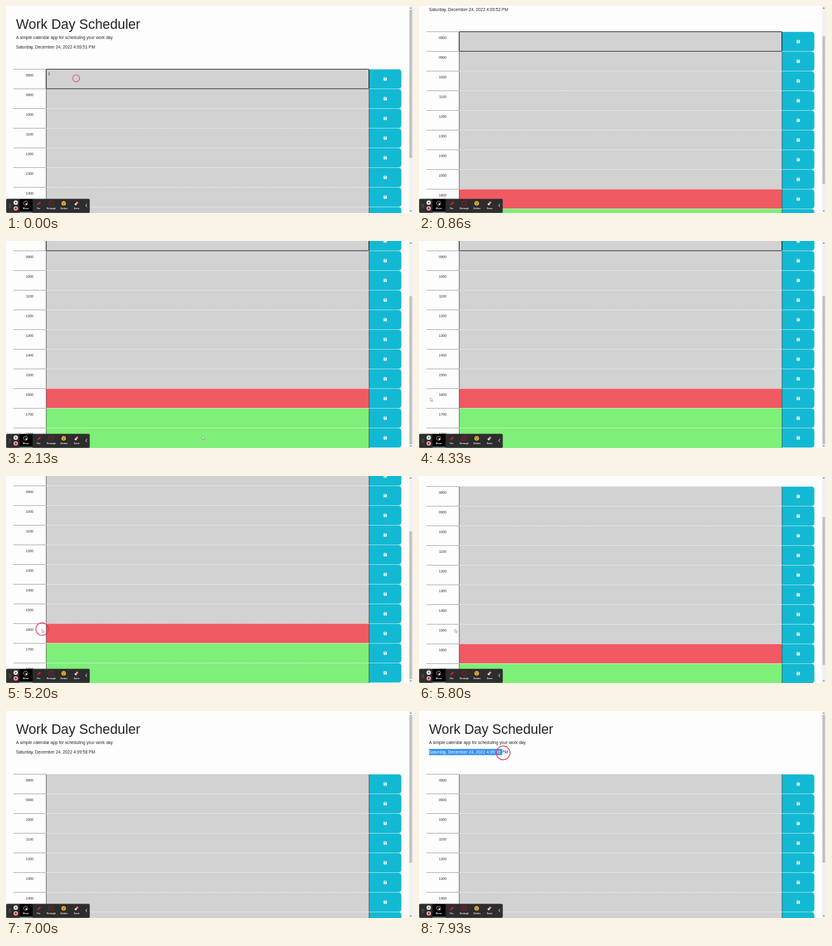
An HTML page that plays this animation: 640x326 px, repeating every 8000 ms.

```html
<!DOCTYPE html>
<html lang="en">
<head>
<meta charset="utf-8">
<title>Work Day Scheduler</title>
<style>
html, body { margin: 0; width: 100%; height: 100%; overflow: hidden; background: #fdfdfd; }
svg { display: block; width: 100vw; height: 100vh; }
text { font-family: "Liberation Sans", Arial, sans-serif; fill: #212529; white-space: pre; }
.small { font-size: 6.67px; }
.tool { font: 500 3.15px Roboto, sans-serif; fill: #fff; text-anchor: middle; }
</style>
</head>
<body>
<svg id="stage" viewBox="0 0 640 326">
  <defs>
    <clipPath id="selClip"><rect id="selArea" x="15.8" y="59.8" width="0" height="9.8"/></clipPath>
    <g id="disk">
      <path d="M-2.5-2.5H1.5L2.5-1.5V2.5H-2.5Z" fill="#fff"/>
      <path d="M-1.5-1.6H.9V-.4H-1.5Z" fill="#13b9d3"/>
      <circle cy="1.1" r=".7" fill="#13b9d3"/>
    </g>
  </defs>
  <g id="page">
    <text x="15.8" y="36" font-size="21.35">Work Day Scheduler</text>
    <text class="small" x="15.8" y="51.6">A simple calendar app for scheduling your work day</text>
    <text class="small" id="clock" x="15.8" y="67"></text>
    <g clip-path="url(#selClip)">
      <rect x="15" y="59" width="130" height="12" fill="#3390ee"/>
      <text class="small" id="clockSel" x="15.8" y="67" style="fill:#fff"></text>
    </g>
    <g id="rows"></g>
    <rect id="focus" x="63.2" y="99.5" width="507.4" height="30.8" rx=".6" fill="none" stroke="#222"/>
    <path id="caret" d="M67.8 104.2V109.4" stroke="#222" stroke-width=".7"/>
  </g>
  <g>
    <rect x="633.6" width="6.4" height="326" fill="#f1f1f1"/>
    <rect id="thumb" x="634.4" y="6" width="4.2" height="233" fill="#c1c1c1"/>
    <path d="M635 4L636.5 2.2L638 4ZM635 322L636.5 323.8L638 322Z" fill="#505050"/>
  </g>
  <g id="bar">
    <rect x=".3" y="303.8" width="131.3" height="21.9" rx="1.8" fill="#2d2d2e" stroke="#555" stroke-width=".4"/>
    <rect x="21.3" y="304" width="20.4" height="20.6" fill="#000"/>
    <rect x="21.3" y="324.2" width="20.4" height="1" fill="#9cc6cc"/>
    <path d="M5.2 312V318M7 312V318" stroke="#999" stroke-width=".9" stroke-dasharray=".9 1.4"/>
    <circle cx="15.3" cy="309.7" r="3.4" fill="#f4f4f4"/>
    <path d="M14.5 308.2V311.2M16.1 308.2V311.2" stroke="#333" stroke-width=".8"/>
    <circle cx="15.3" cy="318.8" r="3.3" fill="#f3cfd2"/>
    <rect x="13.6" y="317.1" width="3.4" height="3.4" rx=".5" fill="#e02436"/>
    <circle cx="30.8" cy="310.5" r="3.2" fill="none" stroke="#e7a9b0" stroke-width=".8"/>
    <path d="M30.6 309.6L34.2 312.8L32.4 313L31.5 314.5Z" fill="#fff"/>
    <path d="M49.2 313.8L49.8 311.6L53.2 308L54.9 309.6L51.4 313.2Z" fill="#e3192f"/>
    <rect x="68" y="308" width="6.2" height="5.6" fill="none" stroke="#b01226" stroke-width=".9"/>
    <circle cx="90.7" cy="310.8" r="3.5" fill="#f6c52c"/>
    <path d="M88.4 309.7H90.2M91.2 309.7H93" stroke="#d5303a" stroke-width="1.3"/>
    <path d="M88.9 311.6Q90.7 314.4 92.5 311.6Z" fill="#6b3b12"/>
    <path d="M107.6 312.3L111.6 307.8L114 309.6L110 314Z" fill="#ee8d98"/>
    <path d="M107.6 312.3L109 310.7L111.4 312.5L110 314Z" fill="#f5e9ea"/>
    <path d="M127.3 311.8L125.4 314.2L127.3 316.6" fill="none" stroke="#fff" stroke-width=".9"/>
  </g>
  <circle id="ring" fill="none" stroke="#df3f56"/>
  <path id="cursor" d="M0 0V5.2L1.3 4.2L2.3 6.2L3.2 5.7L2.4 3.9L4 3.8Z" fill="#fff" stroke="#666" stroke-width=".5"/>
</svg>
<script>
const LOOP = 8000, ROW = 31, TOP = 100, MAX_SCROLL = 115;
const BLUR = 5050, DRAG = 7200;
const $ = id => document.getElementById(id);

function add(parent, tag, attrs, text) {
  const el = document.createElementNS("http://www.w3.org/2000/svg", tag);
  for (const k in attrs) el.setAttribute(k, attrs[k]);
  if (text) el.textContent = text;
  parent.appendChild(el);
}

function addRow(hour) {
  const y = TOP + (hour - 8) * ROW, edge = y - .5, g = $("rows");
  const fill = hour < 16 ? "#d2d2d2" : hour === 16 ? "#f05a62" : "#7eef78";
  add(g, "rect", { x: 63, y: y - 1, width: 508, height: ROW + 1, fill });
  add(g, "path", { d: `M63 ${edge}H571`, stroke: "#f0f0f0", "stroke-width": .8, "stroke-dasharray": "1.4 .5" });
  add(g, "path", { d: `M12 ${edge}H63`, stroke: "#666", "stroke-width": .8, "stroke-dasharray": "1.2 .6" });
  add(g, "text", { x: 37.2, y: y + 11.3, "font-size": 5.4, "text-anchor": "middle" }, String(hour * 100).padStart(4, "0"));
  add(g, "path", { d: `M571 ${y - .2}h46q4.7 0 4.7 4.7v21q0 4.7 -4.7 4.7h-46Z`, fill: "#13b9d3" });
  add(g, "path", { d: `M63.3 ${y}v${ROW}M570.9 ${y}v${ROW}`, stroke: "#444", "stroke-width": .8 });
  add(g, "use", { href: "#disk", x: 596.3, y: y + 15 });
}
for (let h = 8; h <= 18; h++) addRow(h);

["Mouse", "Pen", "Rectangle", "Stickers", "Eraser"].forEach((name, i) =>
  add($("bar"), "text", { class: "tool", x: 31.2 + i * 20, y: 319.6 }, name));

function ease(t, from, to) {
  const p = Math.min(1, Math.max(0, (t - from) / (to - from)));
  return p * p * (3 - 2 * p);
}

// Each move: start, end, then where the pointer comes to rest.
const moves = [
  [1730, 2130, 309, 307], [2200, 2800, 601, 240], [3400, 3600, 548, 247],
  [3800, 4330, 18, 247], [4660, BLUR, 56.5, 241], [6400, 6950, 17, 64], [DRAG, 7930, 132, 66]
];

function pointer(t) {
  return moves.reduce(([x, y], [from, to, toX, toY]) => {
    const p = ease(t, from, to);
    return [x + (toX - x) * p, y + (toY - y) * p];
  }, [110, 114]);
}

function drawRing(t, x, y) {
  const age = t >= DRAG ? t - DRAG : t >= BLUR ? t - BLUR : t;
  const grow = Math.min(1, age / 180), ring = $("ring");
  show(ring, t >= DRAG || age < 320);
  ring.setAttribute("cx", x + .3);
  ring.setAttribute("cy", y);
  ring.setAttribute("r", 5.4 + 5.4 * grow);
  ring.setAttribute("stroke-width", 1 + .3 * grow);
}

function show(el, on) {
  el.style.display = on ? "" : "none";
}

function draw(t) {
  const scroll = Math.round(MAX_SCROLL * (ease(t, 300, 1401) - ease(t, 5615, 6146)));
  const [x, y] = pointer(t);
  $("page").setAttribute("transform", `translate(0 ${-scroll})`);
  $("thumb").setAttribute("y", 6 + 81 * scroll / MAX_SCROLL);

  const sec = 51 + Math.floor((t + 600) / 1000);
  $("clock").textContent = $("clockSel").textContent = `Saturday, December 24, 2022 4:09:${sec} PM`;
  $("selArea").setAttribute("width", t < DRAG ? 0 : Math.min(114.8, x - 17));

  show($("focus"), t < BLUR);
  show($("caret"), t < BLUR && t % 1000 < 500);
  drawRing(t, x, y);

  // The pointer is an unseen text beam over the first field and the heading.
  show($("cursor"), t >= 1730 && t < 6930);
  $("cursor").setAttribute("transform", `translate(${x} ${y})`);
}

const start = performance.now();
function tick() {
  draw((performance.now() - start) % LOOP);
  requestAnimationFrame(tick);
}
tick();
</script>
</body>
</html>
```
